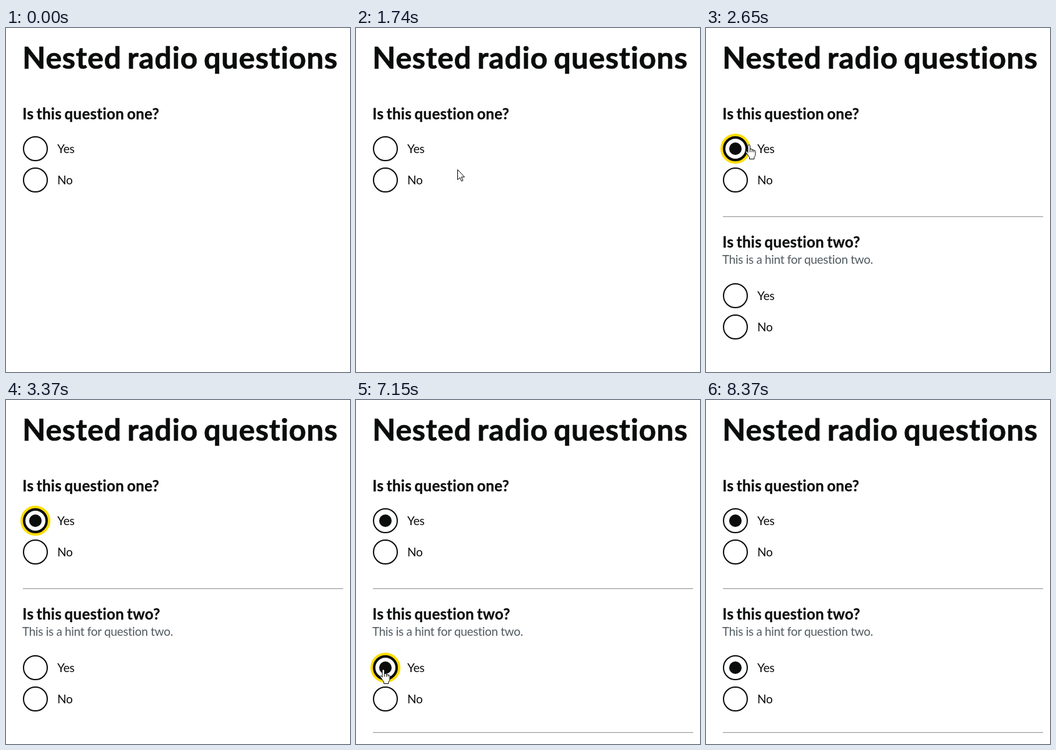
An HTML page that plays this animation: 550 by 550 pixels, repeating every 8470 ms.

```html
<!DOCTYPE html>
<html lang="en">
<head>
<meta charset="utf-8">
<title>Nested radio questions</title>
<style>
  html, body { margin: 0; height: 100%; overflow: hidden; background: #fff; }
  svg { display: block; width: 100%; height: 100%; }
  text { font: 19px Lato, "Open Sans", sans-serif; letter-spacing: -.1px; fill: #0b0c0c; }
  .title, .question { font-weight: 700; stroke: #0b0c0c; }
  .title { font-size: 48px; letter-spacing: .85px; word-spacing: -3.5px; stroke-width: .7px; }
  .question { font-size: 24px; letter-spacing: .3px; word-spacing: -1.6px; stroke-width: .3px; }
  .hint { fill: #505a5f; letter-spacing: -.32px; }
  .halo { fill: #fd0; }
  .ring { fill: #fff; stroke: #0b0c0c; }
  .dot { fill: #0b0c0c; }
  .cursor { fill: #fff; stroke: #000; stroke-linejoin: round; }
</style>
</head>
<body>
<svg viewBox="0 0 550 550">
  <defs>
    <g id="rule">
      <path d="M27 .5H539" stroke="#9a9a9a"/>
      <path d="M27 1.5H539" stroke="#eee"/>
    </g>
  </defs>
  <text class="title" x="26.3" y="65">Nested radio questions</text>
  <text class="question" x="26.3" y="146">Is this question one?</text>
  <g id="first"></g>
  <g id="nested">
    <use href="#rule" y="301"/>
    <text class="question" x="26.3" y="351">Is this question two?</text>
    <text class="hint" x="26" y="377">This is a hint for question two.</text>
    <g id="second"></g>
  </g>
  <use id="lastRule" href="#rule" y="531"/>
  <g id="cursor" class="cursor">
    <path id="arrow" d="M.5 .5V16.5L4.2 13.2L6.7 18.8L9 17.8L6.6 12.2H11.5Z"/>
    <g id="hand" transform="translate(-6 .5)">
      <path d="M4 13V2a1.7 1.7 0 0 1 3.4 0V8q0-1.3 1.6-1.2 1.6.1 1.6 1.4V9q0-1 1.5-.9 1.3.1 1.3 1.3V10q.3-1 1.3-.8 1.3.2 1.3 1.6V16q0 2-2 4V23H6.5V20Q4.5 18 3 15L.8 12.5q-.6-1.6.7-2 1.3-.2 2.5 1.8"/>
      <path d="M7.4 8v4M10.6 9v3M13.4 10v2" fill="none"/>
    </g>
  </g>
</svg>
<script>
const LOOP = 8470;
const FIRST_CLICK = 2610, SECOND_CLICK = 7090, BLUR = 8370;

// Cursor waypoints: time, x, y. The cursor is hidden outside these tracks.
const tracks = [
  [[1370, 277, 533], [1550, 220, 395], [1740, 162, 226], [1950, 98, 193],
   [2140, 68, 182], [2250, 69, 186], [2920, 69, 186], [3070, 190, 192],
   [3370, 500, 216]],
  [[6340, 486, 485], [6480, 230, 456], [6630, 44, 430], [7230, 44, 430],
   [7500, 190, 475], [7770, 435, 552]]
];

const byId = id => document.getElementById(id);
const show = (node, on) => node.style.display = on ? "" : "none";

function radio(parent, label, y) {
  const group = document.createElementNS("http://www.w3.org/2000/svg", "g");
  group.innerHTML = `
    <circle class="halo" cx="47" cy="${y}" r="24"/>
    <circle class="ring" cx="47" cy="${y}"/>
    <circle class="dot" cx="47" cy="${y}" r="10"/>
    <text x="82" y="${y + 7}">${label}</text>`;
  byId(parent).append(group);
  const [halo, ring, dot] = group.children;
  return (checked, focused) => {
    show(halo, focused);
    show(dot, checked);
    ring.setAttribute("r", focused ? 18 : 19);
    ring.setAttribute("stroke-width", focused ? 4 : 2);
  };
}

const setFirst = radio("first", "Yes", 193);
radio("first", "No", 243)(false, false);
const setSecond = radio("second", "Yes", 428);
radio("second", "No", 478)(false, false);

function cursorAt(time) {
  for (const track of tracks) {
    const i = track.findIndex(point => point[0] > time);
    if (i < 1) continue;
    const [t0, x0, y0] = track[i - 1], [t1, x1, y1] = track[i];
    const k = (time - t0) / (t1 - t0);
    return [x0 + (x1 - x0) * k, y0 + (y1 - y0) * k];
  }
}

const overOption = (x, y) =>
  x > 27 && x < 124 && [193, 243, 428, 478].some(row => Math.abs(y - row) <= 20);

function draw(time) {
  const opened = time >= FIRST_CLICK, answered = time >= SECOND_CLICK;
  setFirst(opened, opened && !answered);
  setSecond(answered, answered && time < BLUR);
  show(byId("nested"), opened);
  show(byId("lastRule"), answered);

  const position = cursorAt(time);
  show(byId("cursor"), position);
  if (position) {
    const [x, y] = position.map(Math.round), hovering = overOption(x, y);
    byId("cursor").setAttribute("transform", `translate(${x} ${y})`);
    show(byId("hand"), hovering);
    show(byId("arrow"), !hovering);
  }
}

const start = performance.now();
function tick() {
  draw((performance.now() - start) % LOOP);
  requestAnimationFrame(tick);
}
tick();
</script>
</body>
</html>
```
